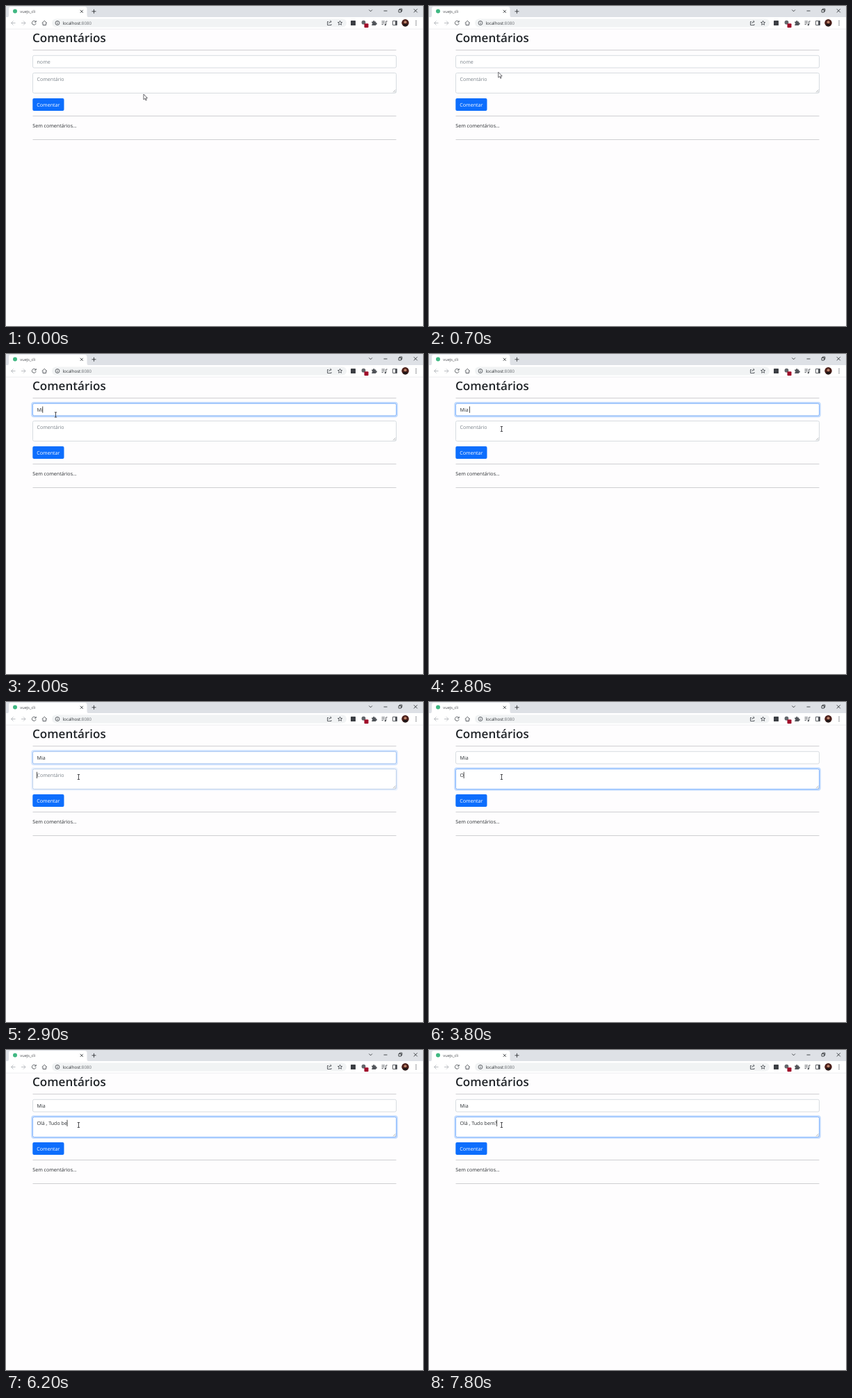
Write an HTML page that moves like this. It is 600 px wide and 461 px high and loops after 8000 ms.

```html
<!DOCTYPE html>
<html lang="pt">
<head>
<meta charset="utf-8">
<title>Comentários</title>
<style>
  html, body { margin: 0; width: 100%; height: 100%; overflow: hidden; background: #fefdfe; }
  svg { display: block; width: 600px; height: 461px; }
  text {
    font: 7.1px "Open Sans", "Noto Sans", sans-serif;
    fill: #2b2f33; white-space: pre; text-rendering: geometricPrecision;
  }
  .title { font-size: 17.1px; font-weight: 600; fill: #212529; }
  .tab { font-size: 5.7px; fill: #4a4d51; }
  .url { font-size: 6.15px; }
  .hint { fill: #7b838a; }
  .rule { stroke: #cfcfd2; }
  .icon { fill: none; stroke: #5f6368; stroke-width: 1; }
  .win { fill: none; stroke: #35383c; stroke-width: .9; }
  .off { stroke: #bcbfc3; }
  .ring { fill: none; stroke: #c2dbfe; stroke-width: 2; }
  .edge { fill: #fff; stroke: #d3d8dd; stroke-width: .9; }
  .glow { fill: none; stroke: #86b7fe; }
</style>
</head>
<body>
<svg viewBox="0 0 600 461">
  <rect width="600" height="461" fill="#fefdfe"/>

  <!-- tab strip -->
  <rect width="600" height="17" fill="#dee1e6"/>
  <path d="M1 16.5Q4 16.5 4 13V4Q4 1 7 1H113Q116.500 1 116.500 4V13Q116.500 16.500 120 16.500Z" fill="#fff"/>
  <circle cx="13" cy="7.6" r="3" fill="#41b883"/>
  <text class="tab" x="20.3" y="9.7">vuejs_cli</text>
  <path class="win" d="M106.800 5.800l4 4m0-4l-4 4M123.500 7.800h6m-3-3v6"/>
  <path class="win" d="M522.300 5.500l2.300 2.300 2.300-2.300M543.500 7h5M565 5.500h3.500v3.500h-3.500zM566.300 5.300v-1.200h3.500v3.500h-1.200M586.800 4.300l5 5m0-5l-5 5"/>

  <!-- toolbar -->
  <rect y="16" width="600" height="17" fill="#fff"/>
  <path d="M0 33.200H600" stroke="#e3e4e7" stroke-width=".6"/>
  <rect x="66" y="18.500" width="424" height="12" rx="6" fill="#f1f3f4"/>
  <path class="icon off" d="M13.500 24.500H7.500m3-3l-3 3 3 3M22 24.500h6m-3-3l3 3-3 3"/>
  <path class="icon" d="M42.700 22.700A2.900 2.900 0 1 0 43.100 25M43.200 21v2.200H41M51.700 24.600l3.600-3.300 3.600 3.300M53 24.200v3.300h4.600v-3.300"/>
  <circle class="icon" cx="74" cy="24.500" r="2.900" stroke-width=".8"/>
  <path class="icon" d="M74 24.200v2M74 22.500v.8"/>
  <text class="url" x="81.500" y="26.700">localhost<tspan fill="#6b6f74">:8080</tspan></text>
  <path class="icon" stroke-width=".8" d="M464 22.500h-1.500v5h5.500V26M464.300 25.300q.5-2.800 3.700-2.800m-1.500-1.500l1.700 1.500-1.700 1.500"/>
  <path id="star" class="icon"/>
  <rect x="496" y="21" width="7" height="7" rx=".6" fill="#3c3f44"/>
  <circle cx="514.500" cy="23.700" r="2.900" fill="#63676c"/>
  <rect x="515.500" y="25.300" width="6" height="6" rx="1" fill="#a00d2a"/>
  <path d="M526.300 22.500h1.800a1.200 1.200 0 1 1 2.300 0h1.900v1.900a1.200 1.200 0 1 1 0 2.300v1.300h-6v-1.500a1 1 0 1 0 0-2z" fill="#505459"/>
  <path class="icon" d="M540.500 22h4.500M540.500 24.300h4.500M540.500 26.600h2.500M546.700 27v-5h2"/>
  <circle cx="545.800" cy="27" r="1.200" fill="#505459"/>
  <path class="icon" d="M556.500 21.500h6v6h-6z"/>
  <rect x="560" y="21.500" width="2.500" height="6" fill="#505459"/>
  <circle cx="574.500" cy="24.300" r="5.200" fill="#4a1e19"/>
  <circle cx="574.500" cy="23.300" r="2" fill="#b98068"/>
  <path d="M571 28.100q0-2.500 3.500-2.500t3.500 2.500q-3.500 2.800-7 0z" fill="#1f1718"/>
  <g fill="#505459"><circle cx="590" cy="21.800" r=".75"/><circle cx="590" cy="24.500" r=".75"/><circle cx="590" cy="27.200" r=".75"/></g>

  <!-- page -->
  <text class="title" x="38" y="51.900">Comentários</text>
  <path class="rule" d="M38.500 63.500H561.500M38.500 158.500H561.500M38.500 192.500H561.500"/>
  <g id="name"></g>
  <g id="comment"></g>
  <path d="M557 124.300l3.600-3.600M559.200 124.500l1.500-1.500" stroke="#8f9398" stroke-width=".7"/>
  <rect x="38.300" y="133" width="45.200" height="18" rx="2" fill="#0d6efd"/>
  <text x="44.300" y="144.700" style="fill:#fff">Comentar</text>
  <text x="38.300" y="174.800">Sem comentários...</text>

  <path id="arrow" d="M0 0V7.800L1.800 6.200 3.100 9 4.300 8.500 3.100 5.700H5.500Z" fill="#fff" stroke="#45454a" stroke-width=".8"/>
  <path id="beam" d="M-1.700-3.500H1.700M0-3.500V3.500M-1.700 3.500H1.700" fill="none" stroke="#3c3c40" stroke-width=".9"/>
</svg>
<script>
const LOOP = 8000, STEP = 100, TEXT_X = 44.5;
const $ = id => document.getElementById(id);
const clamp = v => Math.max(0, Math.min(1, v));

$("star").setAttribute("d", Array.from({ length: 10 }, (_, i) => {
  const a = i * Math.PI / 5 - Math.PI / 2, r = i % 2 ? 1.5 : 3.3;
  return (i ? "L" : "M") + (480.6 + r * Math.cos(a)) + " " + (24.6 + r * Math.sin(a));
}).join("") + "Z");

// keys: time at which each character of text appears
const fields = [
  { id: "name", top: 71.3, height: 17.7, base: 82.8, hint: "nome",
    text: "Mia ", keys: [1600, 1900, 2100, 2400], focus: 850, blur: 2850 },
  { id: "comment", top: 96.5, height: 29, base: 108, hint: "Comentário",
    text: "Olá , Tudo bem?",
    keys: [3600, 4200, 4500, 4800, 5300, 5400, 5600, 5700, 5800, 5900, 6000, 6100, 6200, 7000, 7800],
    focus: 2850, blur: Infinity }
];

for (const f of fields) {
  const g = $(f.id);
  g.innerHTML = `
    <rect class="edge" x="38.500" y="${f.top}" width="523" height="${f.height}" rx="2"/>
    <g><rect class="ring" x="37.200" y="${f.top - 1.3}" width="525.600" height="${f.height + 2.6}" rx="3"/>
    <rect class="glow" x="38.500" y="${f.top}" width="523" height="${f.height}" rx="2"/></g>
    <text x="${TEXT_X}" y="${f.base}"></text>
    <rect y="${f.base - 7.3}" width=".8" height="9.300" fill="#222"/>`;
  [, f.glow, f.label, f.caret] = g.children;
}

// time, x, y of the pointer
const path = [
  [0, 198, 127], [100, 198, 127], [500, 128, 103], [900, 71.5, 87.5],
  [2000, 71.5, 87.5], [2400, 89, 94], [2700, 104.5, 108], [LOOP, 104.5, 108]
];

function pointerAt(t) {
  const i = path.findIndex(p => p[0] > t);
  const [t0, x0, y0] = path[i - 1], [t1, x1, y1] = path[i];
  const k = (t - t0) / (t1 - t0), e = k * k * (3 - 2 * k);
  return [x0 + (x1 - x0) * e, y0 + (y1 - y0) * e];
}

function drawField(f, t) {
  const typed = f.keys.filter(k => k <= t);
  const value = f.text.slice(0, typed.length);
  f.label.textContent = value || f.hint;
  f.label.classList.toggle("hint", !value);
  f.glow.style.opacity = clamp((t - f.focus) / 150) - clamp((t - f.blur) / 150);

  // the blink restarts with every key
  const idle = t - (typed.at(-1) ?? f.focus);
  const active = t >= f.focus && t < f.blur;
  f.caret.style.opacity = active && idle % 1000 < 500 ? 1 : 0;
  const width = value ? f.label.getComputedTextLength() : 0;
  f.caret.setAttribute("x", TEXT_X + width - .3);
}

function draw(now) {
  const t = Math.floor(now % LOOP / STEP) * STEP;
  fields.forEach(f => drawField(f, t));
  const [x, y] = pointerAt(t);
  const inField = fields.some(f => y > f.top && y < f.top + f.height);
  const overText = inField && x > 38;
  for (const id of ["arrow", "beam"]) {
    $(id).setAttribute("transform", `translate(${x} ${y})`);
    $(id).style.display = (id === "beam") === overText ? "" : "none";
  }
}

const start = performance.now();
function tick() {
  draw(performance.now() - start);
  requestAnimationFrame(tick);
}
tick();
</script>
</body>
</html>
```
